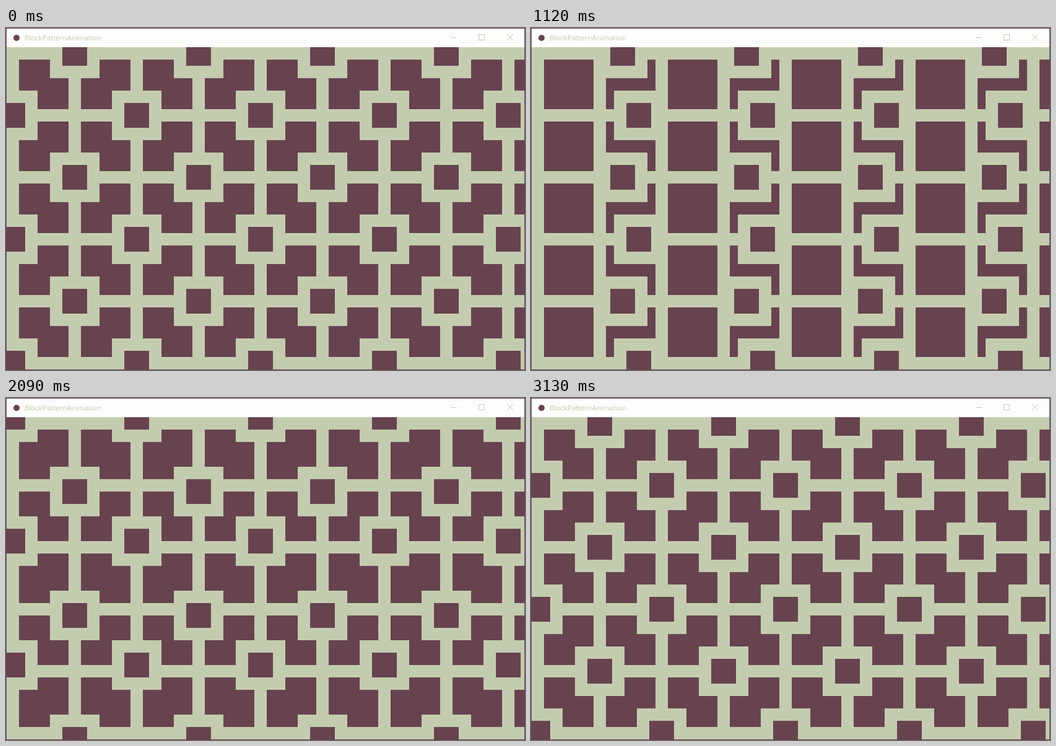
Animation, 838 px wide and 552 px high, one loop 3200 ms. Source, as an HTML page with a canvas:

```html
<!DOCTYPE html>
<html lang="en">
<head>
<meta charset="utf-8">
<title>Block pattern</title>
<style>
html, body { margin: 0; width: 100%; height: 100%; overflow: hidden; background: #fdfdfd; }
canvas { display: block; }
</style>
</head>
<body>
<canvas id="stage" width="838" height="552"></canvas>
<script>
const ctx = document.getElementById('stage').getContext('2d');
const W = 838, H = 552, LOOP = 3200;
const DARK = '#67434f', LIGHT = '#c4ccb0', BAR = '#fdfdfd';
const CELL = 100, X0 = 11, Y0 = 41;
const STARTS = [46, 836, 1594, 2416];
const MOVE = 726;

const box = (color, x, y, w, h) => {
  ctx.fillStyle = color;
  ctx.fillRect(x, y, w, h);
};

const centred = (color, x, y, size) => box(color, x - size / 2, y - size / 2, size, size);

// The picture advances in ticks of 70 ms, with two shorter ones.
function tick(t) {
  if (t >= 3130) return 3130;
  const base = t < 1670 ? 0 : 1670;
  return base + Math.floor((t - base) / 70) * 70;
}

const easeOut = u => 1 - (1 - u) ** 2;

function pose(t) {
  let phase = 0;
  while (phase < 3 && t >= STARTS[phase + 1]) phase++;
  const u = Math.min(1, Math.max(0, (t - STARTS[phase]) / MOVE));
  return { phase, shift: Math.round(CELL * easeOut(u)) };
}

// Alternate columns, then alternate rows, slide in opposite directions.
function knots({ phase, shift }) {
  const vertical = phase % 2 === 0;
  const parity = vertical ? 1 : 0;
  const dir = phase < 2 ? 1 : -1;
  const list = [];
  for (let i = -2; i <= 10; i++) {
    for (let j = -2; j <= 7; j++) {
      if (Math.abs(i + j) % 2 !== parity) continue;
      const lane = vertical ? i : j;
      const d = shift * dir * (lane % 2 ? 1 : -1);
      list.push([
        X0 + CELL * i + (vertical ? 0 : d),
        Y0 + CELL * j + (vertical ? d : 0)
      ]);
    }
  }
  return list;
}

function drawPattern(t) {
  ctx.save();
  ctx.beginPath();
  ctx.rect(1, 31, W - 2, H - 32);
  ctx.clip();
  box(LIGHT, 0, 31, W, H);
  for (let x = 21; x < W; x += CELL)
    for (let y = 51; y < H - 1; y += CELL) box(DARK, x, y, 80, 80);
  const points = knots(pose(t));
  for (const [x, y] of points) centred(LIGHT, x, y, 80);
  for (const [x, y] of points) centred(DARK, x, y, 40);
  ctx.restore();
}

function drawWindow() {
  box(DARK, 0, 0, W, H);
  box(BAR, 1, 1, W - 2, 30);

  ctx.fillStyle = DARK;
  ctx.beginPath();
  ctx.arc(17, 16, 5, 0, Math.PI * 2);
  ctx.fill();

  ctx.fillStyle = LIGHT;
  ctx.font = '11.5px "Open Sans", "Noto Sans", sans-serif';
  ctx.fillText('BlockPatternAnimation', 30, 20);

  ctx.strokeStyle = LIGHT;
  ctx.lineWidth = 1;
  ctx.strokeRect(763.5, 10.5, 9, 9);
  ctx.beginPath();
  ctx.moveTo(718, 15.5);
  ctx.lineTo(728, 15.5);
  ctx.moveTo(809, 10);
  ctx.lineTo(819, 20);
  ctx.moveTo(819, 10);
  ctx.lineTo(809, 20);
  ctx.stroke();
}

const begin = performance.now();

function frame() {
  const t = (performance.now() - begin) % LOOP;
  drawWindow();
  drawPattern(tick(t));
  requestAnimationFrame(frame);
}
frame();
</script>
</body>
</html>
```
